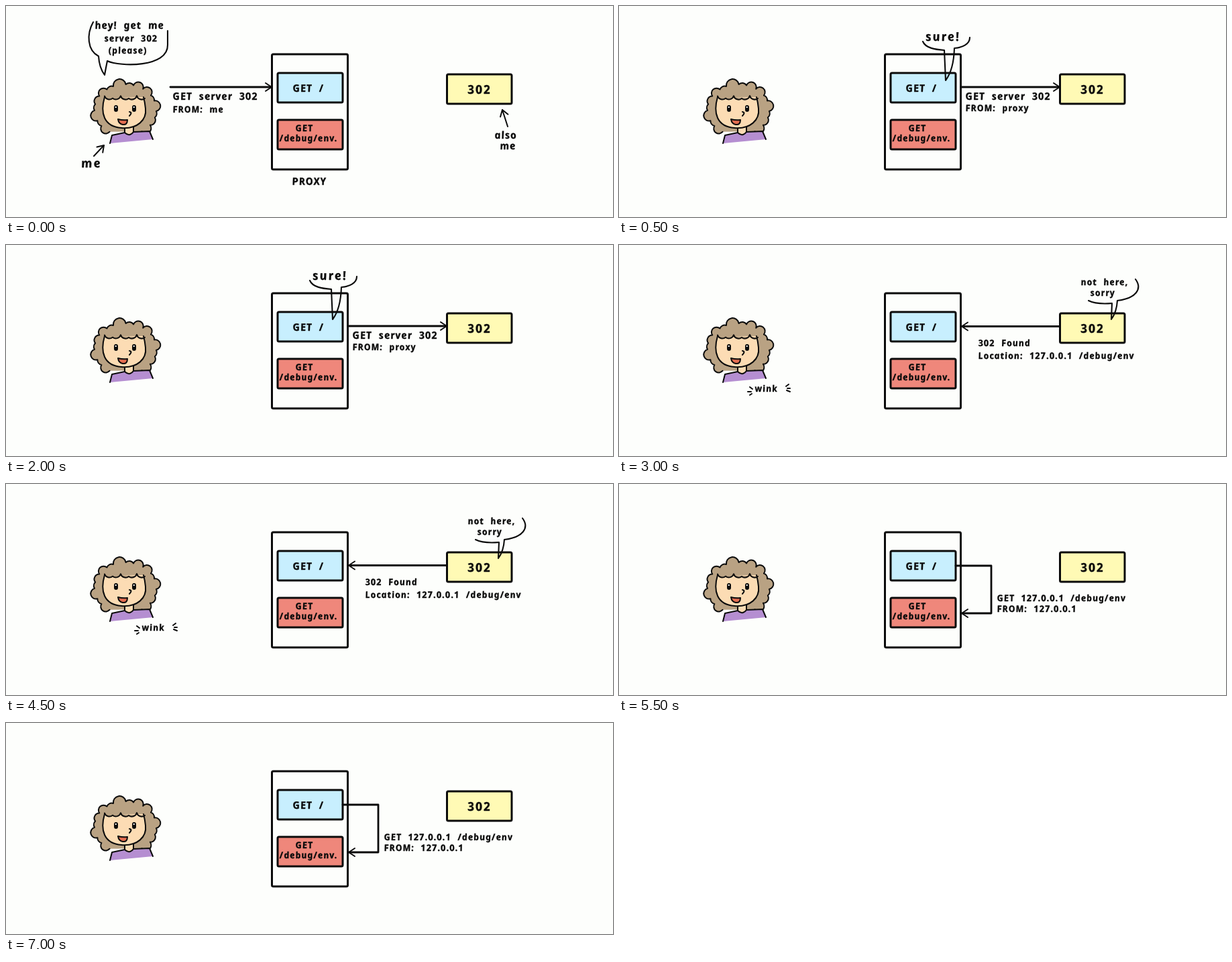
These frames come from a looping animation (905x315 px, 8000 ms). An HTML page:

```html
<!DOCTYPE html>
<html lang="en">
<head>
<meta charset="utf-8">
<title>Redirect through a proxy</title>
<style>
  html, body { margin: 0; width: 100%; height: 100%; overflow: hidden; background: #fdfefc; }
  svg { display: block; width: 905px; height: 315px; }
  g, marker { fill: none; stroke: #0b0b0b; stroke-width: 2; stroke-linecap: round; stroke-linejoin: round; }
  /* Italic letterforms, set upright, come closest to handwriting. */
  text {
    fill: #0b0b0b; stroke-width: .3;
    font: italic 600 13.3px "Noto Sans", "Open Sans", sans-serif;
    letter-spacing: 1px; word-spacing: 5px;
    transform-box: fill-box; transform-origin: left bottom; transform: skewX(10deg);
  }
  .big { font-size: 15px; }
  .huge { font-size: 18px; letter-spacing: 2px; }
  .box { stroke-width: 3; }
  .flow { stroke-width: 2.8; }
  .flow, .hint { marker-end: url(#head); }
  .bubble { stroke-width: 2.1; }
  .hair { fill: #b9a283; }
  .skin { fill: #fcdcb4; }
  .eye { stroke-width: 6; stroke-linecap: round; }
</style>
</head>
<body>
<svg viewBox="0 0 905 315">
  <marker id="head" markerUnits="userSpaceOnUse" markerWidth="24" markerHeight="24"
          refX="9" orient="auto" overflow="visible">
    <path d="M0 -6L9 0L0 6"/>
  </marker>

  <g>
    <g class="box">
      <rect x="396.5" y="72" width="113" height="172" rx="2"/>
      <rect x="405" y="100" width="97" height="44" rx="2" fill="#c8effe"/>
      <rect x="405" y="170" width="97" height="44" rx="2" fill="#ef877b"/>
      <rect x="657.5" y="102" width="96.5" height="44" rx="2" fill="#fffab5"/>
    </g>
    <text class="big" x="429" y="128">GET /</text>
    <text x="433" y="187">GET</text>
    <text x="409" y="202">/debug/env.</text>
    <text class="huge" x="690" y="131">302</text>

    <path id="hair" class="hair"/>
    <path d="M158 193L178 189Q184 194 190 188L214 187L219 199L155 205Z" fill="#b58ed1" stroke="none"/>
    <path d="M155 205L158 193L177 189M190 188L214 187L219 199"/>
    <path class="skin" d="M177 180V189Q184 196 190 188V180"/>
    <path class="skin" d="M147 136C140 160 146 180 172 182C196 184 210 170 208 153Q207 143 205 136"/>
    <path id="fringe" class="hair"/>
    <path class="eye" d="M164 151V155M191 151V155"/>
    <path d="M163.5 151H164M190.5 151H191" stroke="#fff"/>
    <path d="M184 158Q189 159 184 164"/>
    <path d="M167 169Q174 171 181 170Q181 178 174 177Q168 176 167 169Z" fill="#e36d50"/>
  </g>

  <g class="scene">
    <path class="bubble" d="M130 24C120 42 121 66 138 75Q139 92 147 103Q149 92 151 82C170 91 242 92 241 58V37"/>
    <text class="big" x="134" y="34">hey! get me</text>
    <text x="148" y="53">server 302</text>
    <text x="154" y="71">(please)</text>
    <path class="flow" d="M245 121H396"/>
    <text class="big" x="250" y="140">GET server 302</text>
    <text x="250" y="159">FROM: me</text>
    <path class="hint" d="M131 224L146 208"/>
    <text class="huge" x="114" y="241">me</text>
    <text class="big" x="428" y="267">PROXY</text>
    <path class="hint" d="M748 180L740 155"/>
    <text class="big" x="730" y="198">also</text>
    <text class="big" x="738" y="214">me</text>
  </g>

  <g class="scene">
    <path class="bubble" d="M453 53C457 63 472 65 485 66L487 111Q499 95 500 63C512 62 523 57 523 47"/>
    <text class="huge" x="459" y="52">sure!</text>
    <path class="flow" d="M511 121H657"/>
    <text class="big" x="518" y="140">GET server 302</text>
    <text x="518" y="157">FROM: proxy</text>
  </g>

  <g class="scene">
    <path class="bubble" d="M770 51C781 66 770 80 743 83Q742 100 734 111L735 87Q712 89 700 83"/>
    <text x="690" y="60">not here,</text>
    <text x="704" y="76">sorry</text>
    <path class="flow" d="M657 121.5H511"/>
    <text x="537" y="151">302 Found</text>
    <text x="537" y="170">Location: 127.0.0.1 /debug/env</text>
    <text x="204" y="219">wink</text>
    <path d="M195 212L199 215M192 219H197M195 224L198 222M249 211L253 208M251 214H255M250 217L255 219"/>
  </g>

  <g class="scene">
    <path class="flow" d="M502 122H555V193H511"/>
    <text x="565" y="175">GET 127.0.0.1 /debug/env</text>
    <text x="565" y="191">FROM: 127.0.0.1</text>
  </g>
</svg>
<script>
const scenes = document.querySelectorAll(".scene");

// Curly line: arc bumps between points of a curve, where u runs from 0 to 1.
function scallop(id, bumps, radius, curve) {
  let d = `M${curve(0)}`;
  for (let i = 1; i <= bumps; i++) d += `A${radius} ${radius} 0 0 1 ${curve(i / bumps)}`;
  document.getElementById(id).setAttribute("d", d);
}

scallop("hair", 16, 7.5, u => {
  const angle = Math.PI * (0.67 + 1.64 * u) + 0.05 * Math.sin(40 * u);
  return [178 + 46 * Math.cos(angle), 155 + 38 * Math.sin(angle)];
});
scallop("fringe", 5, 7.5, u => [207 - 60 * u, 136 + 2 * Math.cos(15 * u)]);

// The first scene lasts 500 ms, the others 2500 ms each.
function draw() {
  const t = performance.now() % 8000;
  const current = Math.floor((t + 2000) / 2500);
  scenes.forEach((scene, i) => scene.style.display = i === current ? "" : "none");
  requestAnimationFrame(draw);
}
draw();
</script>
</body>
</html>
```
